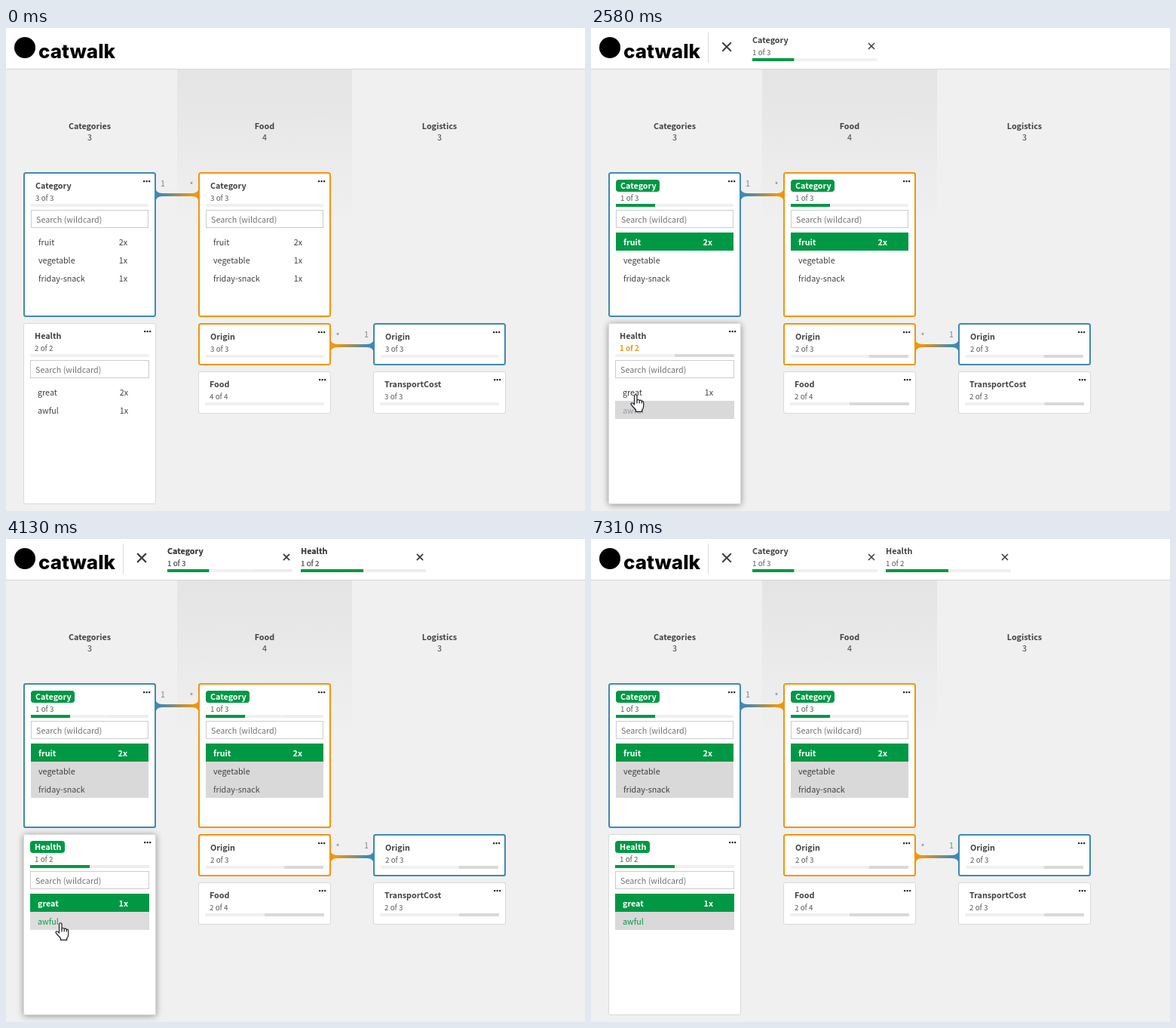
These frames come from a looping animation (768x640 px, 8010 ms). An HTML page:

```html
<!DOCTYPE html>
<html lang="en">
<head>
<meta charset="utf-8">
<title>catwalk</title>
<style>
html, body { margin: 0; width: 100%; height: 100%; overflow: hidden; background: #f0f0f0; }
svg { display: block; width: 768px; height: 640px; }
text {
  font: 10.75px "Noto Sans CJK JP", "Noto Sans CJK SC", "Noto Sans CJK KR", "Noto Sans", sans-serif;
  fill: #404040; white-space: pre;
}
.b { font-weight: 600; }
.sub { font-size: 9.8px; fill: #595959; }
.hint { fill: #737373; }
.mid { text-anchor: middle; }
.end { text-anchor: end; }
.rel { fill: #7b8794; text-anchor: middle; }
.tip { font: 11.3px "Open Sans", "Noto Sans", sans-serif; fill: #575757; }
.logo { font: 800 26px Inter, sans-serif; fill: #000; }
.shadow { filter: drop-shadow(0 1px 4px rgba(0, 0, 0, .4)); }
</style>
</head>
<body>
<svg id="stage" viewBox="0 0 768 640"></svg>
<script>
const LOOP = 8010;
const GREEN = '#009845', LIGHT = '#f0f0f0', GREY = '#d9d9d9', ORANGE = '#ef960f', BLUE = '#3f8ab3';
const DARK = '#404040', FADED = '#999', WHITE = '#fff';

const rect = (x, y, w, h, fill, more = '') =>
  `<rect x="${x}" y="${y}" width="${w}" height="${h}" fill="${fill}" ${more}/>`;
const text = (x, y, s, cls = '', fill = '') =>
  `<text x="${x}" y="${y}" class="${cls}"${fill && ` style="fill:${fill}"`}>${s}</text>`;
const cross = (x, y, r, w) =>
  `<path d="M${x - r} ${y - r}l${2 * r} ${2 * r}m0 ${-2 * r}l${-2 * r} ${2 * r}" stroke="${DARK}" stroke-width="${w}"/>`;

// Share of selected values from the left, share of excluded values from the right.
const bar = (x, y, w, [on, off]) =>
  rect(x, y, w, 4, LIGHT) + rect(x, y, w * on, 4, GREEN) + rect(x + w * (1 - off), y, w * off, 4, GREY);

// Row: name, count, background, text colour
const row = (name, count = '', bg = WHITE, color = DARK) => ({ name, count, bg, color });
const picked = (name, count) => row(name, count, GREEN, WHITE);
const T = 1 / 3;

const category = [
  { sub: '3 of 3', bar: [0, 0], rows: [row('fruit', '2x'), row('vegetable', '1x'), row('friday-snack', '1x')] },
  { sub: '1 of 3', bar: [T, 0], pill: 58, rows: [picked('fruit', '2x'), row('vegetable'), row('friday-snack')] },
  { sub: '1 of 3', bar: [T, T], pill: 58,
    rows: [picked('fruit', '2x'), row('vegetable', '', GREY), row('friday-snack', '', GREY, FADED)] },
  { sub: '1 of 3', bar: [T, 0], pill: 58,
    rows: [picked('fruit', '2x'), row('vegetable', '', GREY), row('friday-snack', '', GREY)] }
];
const health = [
  { sub: '2 of 2', bar: [0, 0], rows: [row('great', '2x'), row('awful', '1x')] },
  { sub: '1 of 2', warn: true, bar: [0, .5], rows: [row('great', '1x'), row('awful', '', GREY, FADED)] },
  { sub: '1 of 2', warn: true, bar: [.5, .5], pill: 46, rows: [picked('great', '1x'), row('awful', '', WHITE, FADED)] },
  { sub: '1 of 2', bar: [.5, 0], pill: 46, rows: [picked('great', '1x'), row('awful', '', GREY, GREEN)] }
];
const small = (n, off) => [0, 1, 2, 3].map(i =>
  ({ sub: `${i ? 2 : n} of ${n}`, bar: [0, i ? off : 0], rows: [] }));

const W = 176;
const cards = [
  { name: 'Category', x: 23, y: 191, h: 192, edge: BLUE, states: category },
  { name: 'Health', x: 23, y: 391, h: 240, states: health },
  { name: 'Category', x: 255, y: 191, h: 192, edge: ORANGE, states: category },
  { name: 'Origin', x: 255, y: 391, h: 56, edge: ORANGE, states: small(3, T) },
  { name: 'Food', x: 255, y: 455, h: 56, states: small(4, .5) },
  { name: 'Origin', x: 487, y: 391, h: 56, edge: BLUE, states: small(3, T) },
  { name: 'TransportCost', x: 487, y: 455, h: 56, states: small(3, T) }
];

function drawCard({ name, x, y, h, edge, states }, i) {
  const s = states[i], b = edge ? 2 : 1;
  const l = x + b, t = y + b, r = x + W - b, inner = W - 16 - 2 * b;
  let out = rect(x + b / 2, y + b / 2, W - b, h - b, WHITE, `rx="2.5" stroke="${edge || GREY}" stroke-width="${b}"`);
  for (const d of [0, 3.5, 7]) out += rect(r - 15 + d, t + 9, 2.3, 2.3, '#222', 'rx=".7"');
  if (s.pill) out += rect(l + 8, t + 8, s.pill, 16, GREEN, 'rx="4"');
  out += text(l + 14, t + 20, name, 'b', s.pill && WHITE);
  out += text(l + 14, t + 36, s.sub, s.warn ? 'sub b' : 'sub', s.warn && ORANGE);
  out += bar(l + 8, t + 40, inner, s.bar);
  if (!s.rows.length) return out;
  out += rect(l + 8.5, t + 48.5, inner - 1, 23, WHITE, 'stroke="#ccc"');
  out += text(l + 15, t + 65, 'Search (wildcard)', 'hint');
  s.rows.forEach((q, k) => {
    const top = t + 78 + 24 * k, weight = q.bg === GREEN ? 'b' : '';
    if (q.bg !== WHITE) out += rect(l + 8, top, inner, 24, q.bg);
    out += text(l + 18, top + 17, q.name, weight, q.color) + text(r - 36, top + 17, q.count, 'end ' + weight, q.color);
  });
  return out;
}

const chip = (x, name, s) =>
  text(x, 20, name, 'b') + text(x, 36, s.sub, 'sub') + bar(x, 40, 166, s.bar) + cross(x + 158, 24, 4, 1.6);

function drawState(i) {
  let out = cards.map(c => drawCard(c, i)).join('');
  if (i > 0) out += rect(155, 6, 1, 40, GREY) + cross(180, 25, 5.8, 2) + chip(214, 'Category', category[i]);
  if (i > 1) out += chip(391, 'Health', health[i]);
  return `<g class="state">${out}</g>`;
}

const link = (x, y, id, left, right) =>
  `<path fill="url(#${id})" d="M${x - 1} ${y - 10}q1 8 9 8h40q8 0 9-8v20q-1-8-9-8h-40q-8 0-9 8z"/>` +
  text(x + 9, y - (left === '1' ? 11 : 9), left, 'rel') + text(x + 47, y - (right === '1' ? 11 : 9), right, 'rel');
const blend = (id, from, to, x) =>
  `<linearGradient id="${id}" gradientUnits="userSpaceOnUse" x1="${x}" x2="${x + 56}" y1="0" y2="0">` +
  `<stop offset=".14" stop-color="${from}"/><stop offset=".86" stop-color="${to}"/></linearGradient>`;
const column = (x, name, n) => text(x, 134, name, 'b mid') + text(x, 149, n, 'mid');

const stage = document.getElementById('stage');
stage.innerHTML =
  `<defs>${blend('toOrange', BLUE, ORANGE, 199)}${blend('toBlue', ORANGE, BLUE, 431)}
   <linearGradient id="band" x2="0" y2="1"><stop stop-color="#e4e4e4"/><stop offset="1" stop-color="#f0f0f0"/></linearGradient></defs>` +
  rect(0, 0, 768, 640, '#f0f0f0') + rect(227, 55, 232, 205, 'url(#band)') +
  rect(0, 0, 768, 54, WHITE) + rect(0, 54, 768, 1, '#d4d4d4') +
  '<circle cx="25" cy="26" r="14"/>' + text(43, 40, 'catwalk', 'logo') +
  column(111, 'Categories', 3) + column(343, 'Food', 4) + column(575, 'Logistics', 3) +
  link(199, 221, 'toOrange', '1', '*') + link(431, 421, 'toBlue', '*', '1') +
  cards.map(c => rect(c.x, c.y, W, c.h, WHITE, 'rx="3" class="shadow"')).join('') +
  [0, 1, 2, 3].map(drawState).join('') +
  `<g id="tip">${rect(145, 577, 371, 80, '#000', 'opacity=".3"')}
   ${rect(142.5, 574.5, 371, 80, WHITE, 'stroke="#767676"')}
   ${text(148, 588, 'Field Health', 'tip')}
   ${text(148, 618, '2 unique values (of which only 2 are present in the Categories table).', 'tip')}
   ${text(148, 648, 'Totally used internally', 'tip')}</g>
   <g id="hand" fill="#fff" stroke="#1c1c28" stroke-width="1.2" stroke-linejoin="round">
   <path d="M5.5 14V2.5a1.75 1.75 0 0 1 3.5 0V9q0-1.5 1.6-1.5t1.6 1.6q.2-1 1.5-1 1.6 0 1.6 1.8.3-.6 1.2-.6 1.2 0 1.2 2V16q0 3-2 5v2.4H7.5V21L2 15q-1.6-2-.4-3 1.4-1 3.9 2z"/>
   <path fill="none" d="M9 9v3.5M12.2 9.2v3.3M15.3 10v2.5"/></g>`;

const states = [...stage.querySelectorAll('.state')];
const shadows = [...stage.querySelectorAll('.shadow')];
const tip = document.getElementById('tip'), hand = document.getElementById('hand');

// Pointer: time, x, y
const path = [
  [120, 423, 587], [200, 400, 580], [300, 322, 545], [400, 235, 452], [500, 175, 385], [620, 120, 335],
  [750, 90, 305], [890, 72, 290], [969, 72, 290], [970, 64, 283], [1670, 64, 283], [1780, 66, 350],
  [1900, 71, 434], [1980, 71, 434], [2150, 65, 470], [2440, 53, 486], [2520, 52, 485], [2960, 52, 485],
  [3270, 64, 509], [3350, 65, 510], [3670, 65, 510], [3720, 59, 496], [3800, 63, 516], [3890, 65, 508],
  [4600, 65, 508], [4780, 95, 518], [5090, 137, 549], [6760, 137, 549], [6900, 230, 562],
  [7080, 460, 595], [7310, 657, 625]
];
function pointer(t) {
  const k = path.findIndex(p => p[0] > t);
  if (k < 1) return null;
  const [t0, x0, y0] = path[k - 1], [t1, x1, y1] = path[k], f = (t - t0) / (t1 - t0);
  return [x0 + (x1 - x0) * f, y0 + (y1 - y0) * f];
}

// Start and length of the fade into each state
const fades = [[0, 0], [1200, 240], [2740, 260], [4040, 110]];
const amount = (t, [start, len]) => t < start ? 0 : t >= start + len ? 1 : .35 + .65 * (t - start) / len;
const show = (el, on) => { el.style.display = on ? '' : 'none'; };

function draw(t) {
  const levels = fades.map(f => amount(t, f));
  states.forEach((el, i) => {
    show(el, levels[i] > 0 && levels[i + 1] !== 1);
    el.style.opacity = levels[i];
  });
  const p = pointer(t);
  show(hand, p);
  if (p) hand.setAttribute('transform', `translate(${p[0].toFixed(1)} ${p[1].toFixed(1)})`);
  cards.forEach((c, i) => {
    const dx = p ? p[0] + 7 - c.x : -1, dy = p ? p[1] + 1 - c.y : -1;
    show(shadows[i], dx >= 0 && dx < W && dy >= 0 && dy < c.h);
  });
  show(tip, t >= 5310 && t < 6760);
}

const begin = performance.now();
function tick() {
  draw((performance.now() - begin) % LOOP);
  requestAnimationFrame(tick);
}
tick();
</script>
</body>
</html>
```
